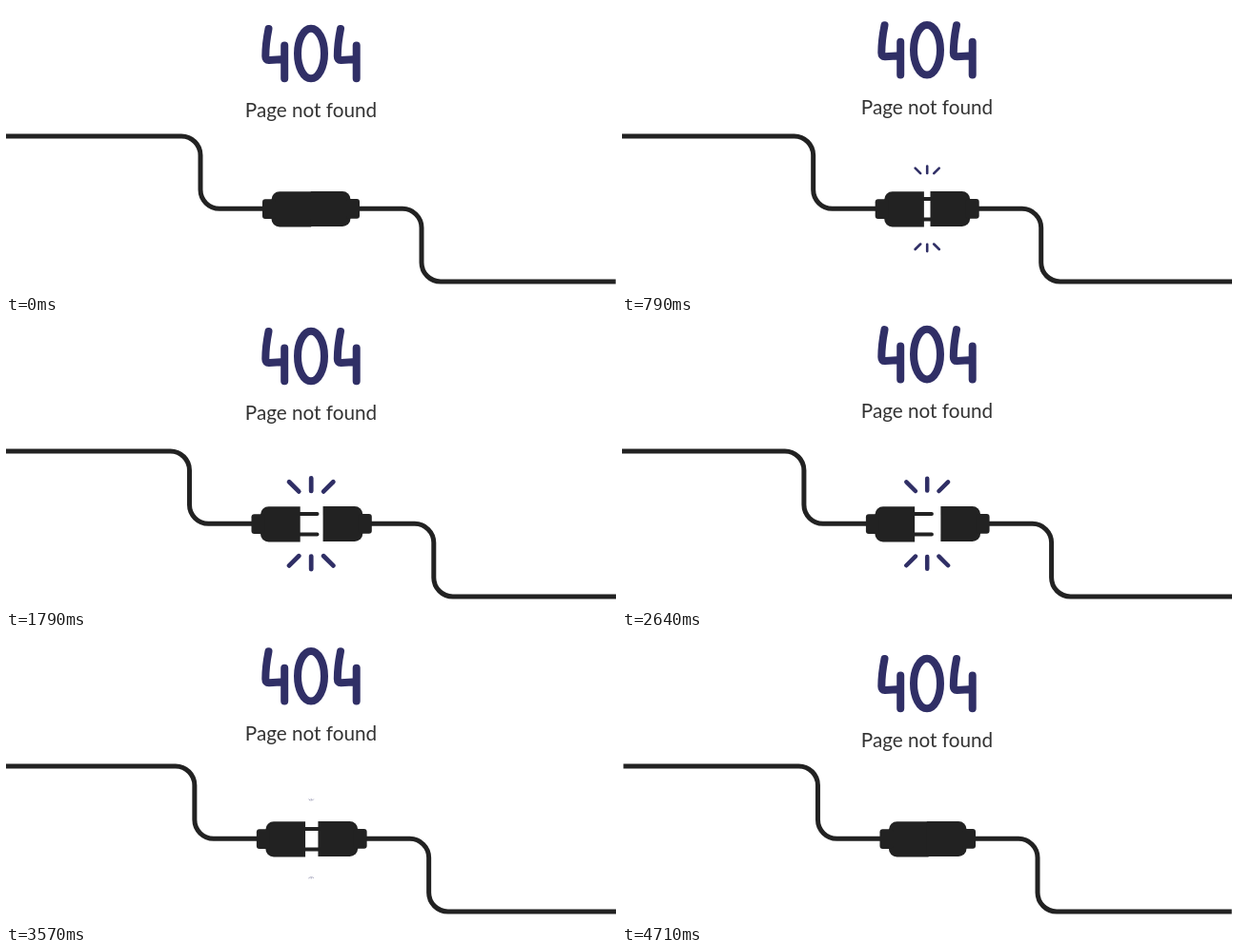
These frames come from a looping animation (640 px wide and 302 px high, 4780 ms). An HTML page:

```html
<!DOCTYPE html>
<html lang="en">
<head>
<meta charset="utf-8">
<title>404 – Page not found</title>
<style>
  html, body { margin: 0; width: 100%; height: 100%; overflow: hidden; background: #fff; }
  svg { display: block; width: 100%; height: 100%; }
  .cable { fill: none; stroke: #222; stroke-width: 5; }
  .prongs { stroke: #222; stroke-width: 4; stroke-linecap: round; }
  .plug { fill: #222; }
  .digits { fill: none; stroke: #302f66; stroke-width: 8; stroke-linecap: round; stroke-linejoin: round; }
  .rays { stroke: #302f66; stroke-width: 4.8; stroke-linecap: round; }
  text { font: 20.7px Lato, "Open Sans", sans-serif; fill: #333; text-anchor: middle; }
</style>
</head>
<body>
<svg viewBox="0 0 640 302">
  <defs>
    <path id="four" d="M275.5 24Q272.3 40 272.3 53Q272.3 57.2 276 57L292 56M292.2 41.5V76.3"/>
    <path id="burst" d="M0-6.8V6.8M-23.2-3L-13 7.2M23.2-3L13 7.2"/>
  </defs>

  <g id="heading">
    <g class="digits" role="img" aria-label="404">
      <use href="#four"/>
      <ellipse cx="320" cy="50" rx="14" ry="26.3"/>
      <use href="#four" x="75.5"/>
    </g>
    <text x="320" y="117.3">Page not found</text>
  </g>

  <g id="left">
    <path class="cable" d="M0 137H184a20 20 0 0 1 20 20v36.3a20 20 0 0 0 20 20h47"/>
    <path class="prongs" d="M318 203H338M318 224.4H338"/>
    <path class="plug" d="M320.2 195.3H287a8.5 8.5 0 0 0-8.5 8.5V224a8.5 8.5 0 0 0 8.5 8.5H320.2z"/>
    <rect class="plug" x="269" y="203.2" width="14" height="20.8" rx="3"/>
  </g>

  <g id="right">
    <path class="cable" d="M369 213.3h47a20 20 0 0 1 20 20v36.7a20 20 0 0 0 20 20H639.7"/>
    <path class="plug" d="M319.8 195H353a8.5 8.5 0 0 1 8.5 8.5V223.5a8.5 8.5 0 0 1-8.5 8.5H319.8z"/>
    <rect class="plug" x="357" y="203" width="14" height="20.8" rx="3"/>
  </g>

  <use id="raysTop" class="rays" href="#burst"/>
  <use id="raysBottom" class="rays" href="#burst"/>
</svg>
<script>
  const LOOP = 4780;
  const RAY_PEAK = 2025, RAY_TIME = 1600;
  const place = (id, transform) =>
    document.getElementById(id).setAttribute('transform', transform);

  function draw() {
    const t = performance.now() % LOOP;
    const swing = (1 - Math.cos(2 * Math.PI * t / LOOP)) / 2;

    // The left plug starts at rest and returns slightly past it.
    const leftX = t < LOOP / 2 ? -13.5 * swing : 1.5 - 15 * swing;
    place('left', `translate(${leftX} 0)`);
    place('right', `translate(${15 * swing} 0)`);
    place('heading', `translate(0 ${-15.3 * swing})`);

    const scale = Math.max(0, 1 - Math.abs((t - RAY_PEAK) / RAY_TIME) ** 3);
    place('raysTop', `translate(320.2 172.2) scale(${scale})`);
    place('raysBottom', `translate(320.2 254.4) scale(${scale} ${-scale})`);

    requestAnimationFrame(draw);
  }
  draw();
</script>
</body>
</html>
```
